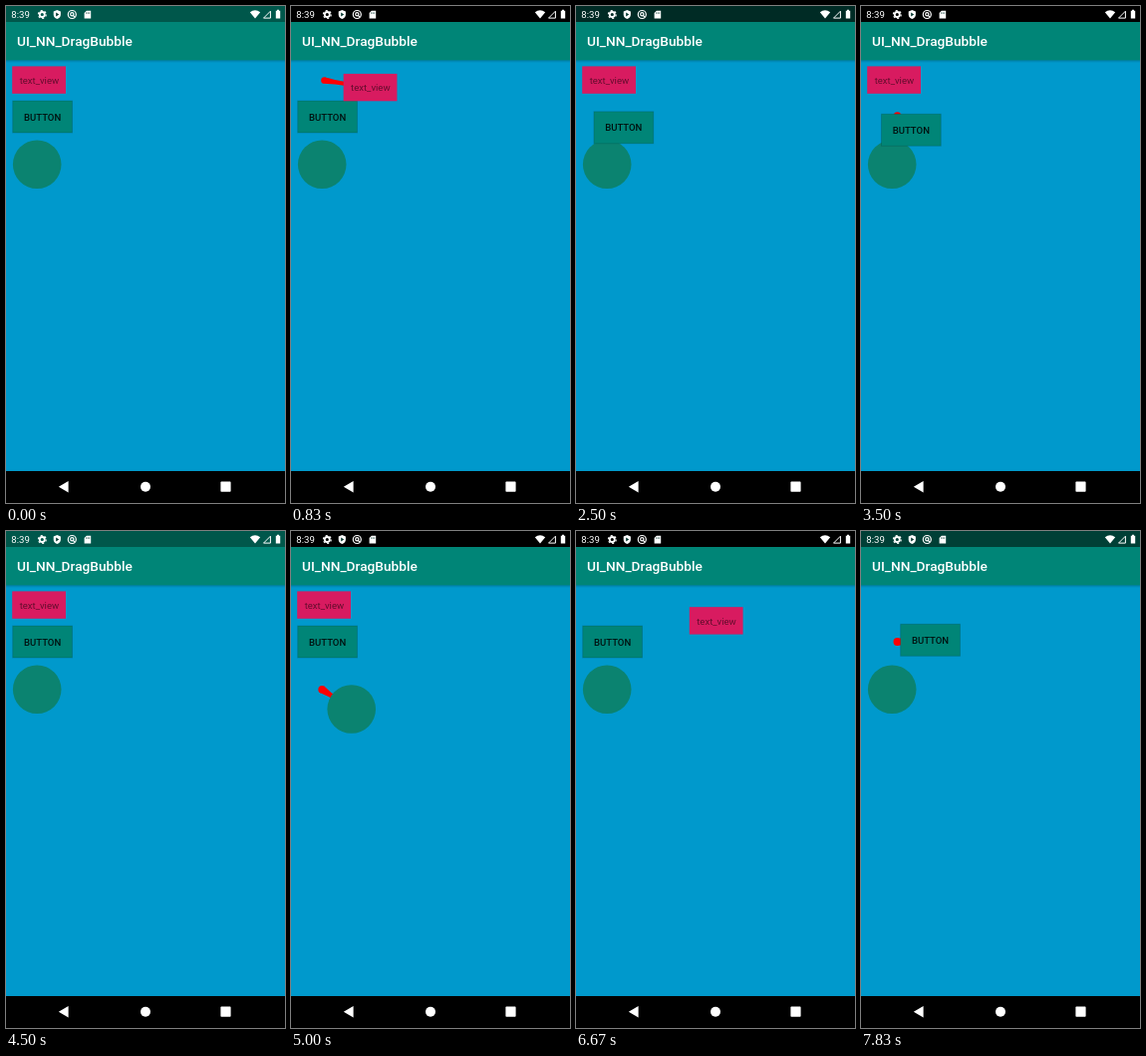
Animation of 280 by 498 pixels, one loop 8000 ms. Source, as an HTML page:

```html
<!DOCTYPE html>
<html lang="en">
<head>
<meta charset="utf-8">
<title>Drag bubble</title>
<style>
  html, body { margin: 0; width: 100%; height: 100%; overflow: hidden; background: #09c; }
  svg { display: block; width: 280px; height: 498px; font-family: Roboto, sans-serif; }
  .medium { font-weight: 500; }
</style>
</head>
<body>
<svg viewBox="0 0 280 498">
  <defs>
    <linearGradient id="shadow" x2="0" y2="1">
      <stop stop-opacity=".2"/><stop offset="1" stop-opacity="0"/>
    </linearGradient>
  </defs>
  <rect width="280" height="498" fill="#09c"/>
  <rect y="54" width="280" height="3" fill="url(#shadow)"/>
  <rect y="16" width="280" height="38.3" fill="#008577"/>
  <text class="medium" x="11" y="40.2" font-size="13.7" fill="#fff">UI_NN_DragBubble</text>

  <rect width="280" height="16" fill="#00574b"/>
  <rect id="shade" width="280" height="16"/>
  <g fill="#fff">
    <text x="5.3" y="12" font-size="9.6">8:39</text>
    <circle cx="36.3" cy="8.5" r="2.5" fill="none" stroke="#fff" stroke-width="1.8"/>
    <circle cx="36.3" cy="8.5" r="3.9" fill="none" stroke="#fff" stroke-width="1.2" stroke-dasharray="2 2.08"/>
    <path d="M51.3 4l3.6 1.5v3q0 3-3.6 4.6q-3.6-1.6-3.6-4.6v-3z"/>
    <path d="M50.2 6.5l3 2-3 2z" fill="#00332c"/>
    <g fill="none" stroke="#fff" stroke-width="1.2">
      <circle cx="66.3" cy="8.5" r="4"/>
      <circle cx="66.3" cy="8.3" r="1.6"/>
      <path d="M67 9.2l2 2"/>
    </g>
    <path d="M80.8 4.8h4.4v7.6h-6.6v-5.4z"/>
    <path d="M80.7 6.3v1.6M82.2 6.3v1.6M83.7 6.3v1.6" stroke="#00332c" stroke-width=".6"/>
    <path d="M244.8 6.2q5.2-4 10.4 0l-5.2 6.4z"/>
    <path d="M265.4 5.2v6.9h-6.9z" fill="none" stroke="#fff"/>
    <path d="M270.8 4.8h1.2v-1h2v1h1.2v7.8h-4.4z"/>
  </g>

  <path id="link" fill="red"/>
  <g id="label">
    <rect x="6.2" y="60.4" width="53.8" height="27.4" fill="#d81b60"/>
    <text x="33.4" y="78" font-size="9.55" text-anchor="middle" fill-opacity=".54">text_view</text>
  </g>
  <g id="button">
    <rect x="6.7" y="95" width="59.8" height="32" fill="#008577" stroke="#000" stroke-opacity=".14"/>
    <text class="medium" x="36.6" y="114.5" font-size="9.55" text-anchor="middle" fill-opacity=".87">BUTTON</text>
  </g>
  <circle id="icon" cx="31.2" cy="158.8" r="24.3" fill="#0b8370"/>

  <rect y="466" width="280" height="32"/>
  <g fill="#fff">
    <path d="M52.8 481.7l9.8-5.7v11.4z"/>
    <circle cx="140" cy="481.7" r="5"/>
    <rect x="215.4" y="476.6" width="10.2" height="10.2" rx=".8"/>
  </g>
</svg>
<script>
const LOOP = 8000, RATE = 6, REACH = 75;
const $ = id => document.getElementById(id);
const svg = document.querySelector('svg');
const homes = { label: [33.5, 74.5], button: [36.5, 111], icon: [31.2, 158.8] };

// Times count steps, six a second; x and y are the farthest pull.
const drags = [
  { id: 'label', from: 2, until: 10, x: 46.5, y: 7.5 },
  { id: 'button', from: 14, until: 24, x: 21, y: 20.2 },
  { id: 'icon', from: 28, until: 34, x: 30, y: 20 },
  { id: 'label', from: 35, until: 41, x: 109.8, y: 16.1, torn: true },
  { id: 'button', from: 46.45, until: 52, x: 62, y: -3.2 }
];

const clamp = v => Math.max(0, Math.min(1, v));

// Out and back with a slight overshoot, or only out when the link tears.
function pull({ from, until, torn }, n) {
  const p = (n - from) / (until - from);
  return Math.sin(Math.PI * (torn ? .5 : 1.01) * p ** .75);
}

const disc = (x, y, r) => `M${x - r} ${y}a${r} ${r} 0 1 1 ${2 * r} 0a${r} ${r} 0 1 1 ${-2 * r} 0z`;

// Two discs joined by a neck that narrows towards the middle.
function bubble([x, y], dx, dy) {
  const d = Math.hypot(dx, dy);
  if (!d || d > REACH) return '';
  const r = 5.5 - d / 22, R = 5, nx = -dy / d, ny = dx / d, ex = x + dx, ey = y + dy;
  const mid = `Q${x + dx / 2} ${y + dy / 2} `;
  return disc(x, y, r) + disc(ex, ey, R) +
    `M${x - nx * r} ${y - ny * r}${mid}${ex - nx * R} ${ey - ny * R}` +
    `L${ex + nx * R} ${ey + ny * R}${mid}${x + nx * r} ${y + ny * r}z`;
}

function draw(now) {
  const n = Math.floor((now % LOOP) * RATE / 1000 + .03) % (LOOP * RATE / 1000);
  let path = '', shade = 0;
  for (const id in homes) {
    $(id).removeAttribute('transform');
    $(id).removeAttribute('visibility');
  }
  for (const drag of drags) {
    const { id, from, until, x, y, torn } = drag, el = $(id);
    shade = Math.max(shade, clamp(Math.min(n - from, until + 2 - n) / 2));
    if (torn && n >= until) el.setAttribute('visibility', 'hidden');
    else if (n > from && n <= until) {
      const k = pull(drag, n);
      el.setAttribute('transform', `translate(${x * k} ${y * k})`);
      path = bubble(homes[id], x * k, y * k);
      if (svg.lastElementChild !== el) svg.append($('link'), el);
    }
  }
  $('link').setAttribute('d', path);
  $('shade').setAttribute('fill-opacity', shade);
}

const start = performance.now();
function tick() {
  draw(performance.now() - start);
  requestAnimationFrame(tick);
}
tick();
</script>
</body>
</html>
```
